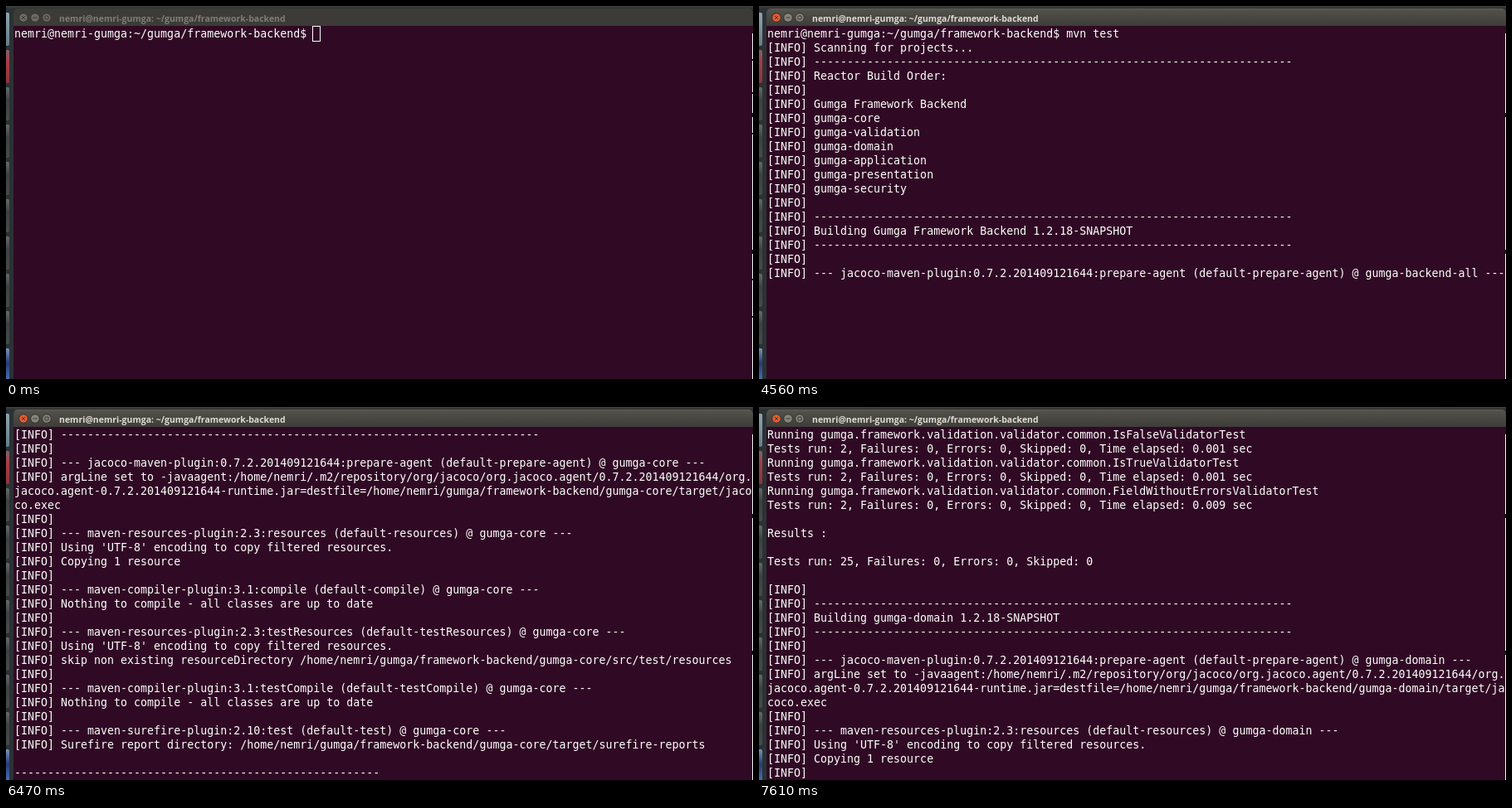
Animation of 900x450 px, one loop 8000 ms. Source, as an HTML page:

```html
<!DOCTYPE html>
<html lang="en">
<head>
<meta charset="utf-8">
<title>Terminal</title>
<style>
  html, body { margin: 0; width: 100%; height: 100%; overflow: hidden; background: #2b3234; }
  body { position: relative; }
  body * { position: absolute; box-sizing: border-box; }
  #top { left: 0; top: 0; width: 900px; height: 3px; background: linear-gradient(#41443f, #2c3231); }
  .icon { left: 0; width: 4px; height: 40px; border-radius: 0 2px 2px 0; }
  #window { left: 9px; top: 3px; width: 891px; height: 447px; background: #300a24; border-radius: 5px 5px 0 0; overflow: hidden; }
  #bar { left: 0; top: 0; width: 891px; height: 21px; background: linear-gradient(#5a5952, #504f49 15%, #3e3d39); }
  #title { left: 55px; top: 4px; font: bold 10.5px/16px "Open Sans", "Noto Sans", sans-serif; color: #dfdbd2; white-space: pre; }
  #buttons { left: 0; top: 0; width: 60px; height: 21px; }
  #edge { left: 899px; top: 33px; width: 1px; height: 417px; background: #f4f2f4; }
  .speck { left: 898px; width: 2px; background: #18101a; }
  #screen { left: 10px; top: 25px; width: 890px; height: 425px; margin: 0; overflow: hidden;
    font: 13.3px/17px "DejaVu Sans Mono", monospace; color: #fff; }
  #cursor { width: 8px; height: 17px; background: #fff; }
  #mouse { width: 9px; height: 16px; }
  .disc { fill: #85837b; stroke: #33322e; }
  .disc.close { fill: #e45c33; }
  .sign { fill: none; stroke: #3a3934; }
  .idle #bar { background: #3c3b37; }
  .idle #title { color: #807d78; }
  .idle #cursor { width: 10px; height: 19px; margin: -1px; background: none; border: 1px solid #fff; }
  .idle .disc { fill: #6b6963; }
  body:not(.idle) .faint { display: none; }
</style>
</head>
<body>
<div id="top"></div>
<div id="window">
  <div id="bar"></div>
  <svg id="buttons">
    <circle class="disc close" cx="12" cy="11" r="5.3"/>
    <circle class="disc" cx="26" cy="11" r="5.3"/>
    <circle class="disc" cx="40" cy="11" r="5.3"/>
    <path class="sign" d="M10 9l4 4m0-4l-4 4M23.5 11h5M38 9h4v4h-4z"/>
  </svg>
  <div id="title">nemri@nemri-gumga: ~/gumga/framework-backend</div>
</div>
<div id="edge"></div>
<pre id="screen"></pre>
<div id="cursor"></div>
<svg id="mouse" viewBox="0 0 9 16">
  <path d="M2 1.5h5M2 14.5h5M4.5 1.5v13" fill="none" stroke="#1a0513" stroke-width="3"/>
  <path d="M2 1.5h5M2 14.5h5M4.5 1.5v13" fill="none" stroke="#fff"/>
</svg>
<script>
const LOOP = 8000, COLS = 111, ROWS = 29, VISIBLE = 25;
const HOME = '/home/nemri', ROOT = HOME + '/gumga/framework-backend';
const PROMPT = 'nemri@nemri-gumga:~/gumga/framework-backend$ ';
const $ = id => document.getElementById(id);

// Build log, already wrapped to the terminal width
const log = [PROMPT + 'mvn test'];
const print = s => log.push(...(s.match(new RegExp(`.{1,${COLS}}`, 'g')) || ['']));
const info = (...lines) => lines.forEach(s => print('[INFO] ' + s));
const goal = (name, project) => info('', `--- ${name} @ ${project} ---`);
const rule = '-'.repeat(72), testRule = '-'.repeat(55);
const counts = n => `Tests run: ${n}, Failures: 0, Errors: 0, Skipped: 0`;

function header(title, project, dir) {
  info('', rule, `Building ${title} 1.2.18-SNAPSHOT`, rule);
  goal('jacoco-maven-plugin:0.7.2.201409121644:prepare-agent (default-prepare-agent)', project);
  info(`argLine set to -javaagent:${HOME}/.m2/repository/org/jacoco/org.jacoco.agent/0.7.2.201409121644/org.` +
    `jacoco.agent-0.7.2.201409121644-runtime.jar=destfile=${dir}/target/jacoco.exec`);
}

function build(name, tests) {
  const dir = `${ROOT}/${name}`, copy = "Using 'UTF-8' encoding to copy filtered resources.";
  const fresh = 'Nothing to compile - all classes are up to date';
  header(name, name, dir);
  goal('maven-resources-plugin:2.3:resources (default-resources)', name);
  info(copy, 'Copying 1 resource');
  goal('maven-compiler-plugin:3.1:compile (default-compile)', name);
  info(fresh);
  goal('maven-resources-plugin:2.3:testResources (default-testResources)', name);
  info(copy, `skip non existing resourceDirectory ${dir}/src/test/resources`);
  goal('maven-compiler-plugin:3.1:testCompile (default-testCompile)', name);
  info(fresh);
  goal('maven-surefire-plugin:2.10:test (default-test)', name);
  info(`Surefire report directory: ${dir}/target/surefire-reports`);
  ['', testRule, ' T E S T S', testRule].forEach(print);
  let total = 0;
  for (const [test, n, sec] of tests) {
    print(`Running gumga.framework.${test}Test`);
    print(`${counts(n)}, Time elapsed: ${sec} sec`);
    total += n;
  }
  ['', 'Results :', '', counts(total), ''].forEach(print);
}

info('Scanning for projects...', rule, 'Reactor Build Order:', '', 'Gumga Framework Backend');
for (const part of ['core', 'validation', 'domain', 'application', 'presentation', 'security']) info('gumga-' + part);
header('Gumga Framework Backend', 'gumga-backend-all', ROOT);
goal('gmaven-plugin:1.5:execute (copyGitHooks)', 'gumga-backend-all');
build('gumga-core', [['core.QueryObject', 2, '0.058']]);
build('gumga-validation', [
  ['validation.GumgaValidator', 11, '0.364'],
  ...[['string.NotNullOrEmpty', 3], ['string.IllegalWords', 3], ['collection.NotEmptyCollection', 22],
    ['common.NotNull', 2], ['common.IsFalse', 1], ['common.IsTrue', 1], ['common.FieldWithoutErrors', 9]]
    .map(([test, ms]) => [`validation.validator.${test}Validator`, 2, (ms / 1000).toFixed(3)])
]);
build('gumga-domain', []);

// Timelines: [start in ms, value]
const typed = [[0, ''], [2000, 'clear'], [2470, ''], [3250, 'clear'], [3390, 'mvn test']];
const printed = [[0, 0], [3690, 1], [4400, 2], [4480, 16], [4560, 18], [4860, 22],
  [5720, 27], [5790, 31], [5860, 35], [5930, 39], [6000, 45], [6080, 52],
  [6470, 53], [6560, 75], [6600, 90], [6970, 91], [7330, 106], [7520, 116], [7610, 128]];
const blink = [[0, 1], [1910, 0], [2000, 1], [3010, 0], [3250, 1], [4260, 0], [4860, 1], [5470, 0], [6080, 1]];
const pointer = [[0, null], [1250, [860, 430]], [1290, [770, 340]], [1330, [707, 277]], [2040, null]];
const at = (line, t) => line.findLast(([start]) => start <= t)[1];

function place(el, x, y, shown) {
  el.style.left = x + 'px';
  el.style.top = y + 'px';
  el.style.visibility = shown ? 'visible' : 'hidden';
}

function draw(t) {
  const n = at(printed, t), command = at(typed, t), mouse = at(pointer, t);
  const first = Math.max(0, n - ROWS + 1), row = n - first;
  const text = n ? log.slice(first, Math.min(n, first + VISIBLE)).join('\n') : PROMPT + command;
  if ($('screen').textContent !== text) $('screen').textContent = text;
  const col = n ? 0 : PROMPT.length + command.length;
  place($('cursor'), 10 + 8 * col, 25 + 17 * row, at(blink, t) && row < VISIBLE);
  const [x, y] = mouse || [0, 0];
  place($('mouse'), x - 4, y - 8, mouse);
  document.body.classList.toggle('idle', t < 1210);
}

function add(className, top, style) {
  const el = document.createElement('div');
  el.className = className;
  Object.assign(el.style, { top: top + 'px' }, style);
  document.body.append(el);
}

for (let i = 0; i < 10; i++) {
  const tones = { 0: '#8ea4af, #667e8a', 1: '#7d6468, #a83c47 35%, #8e343e', 9: '#7897b5, #263b78 45%, #4778b6' };
  add('icon', 8 + 45 * i, { background: `linear-gradient(${tones[i] || '#656b6c, #3c4244 40%, #464b4c'})` });
}
for (const y of [129, 294]) add('speck', y, { height: '5px' });
for (const y of [64, 104, 153, 329, 374]) add('speck faint', y, { height: '2px' });

const start = performance.now();
function tick() {
  draw((performance.now() - start) % LOOP);
  requestAnimationFrame(tick);
}
tick();
</script>
</body>
</html>
```
